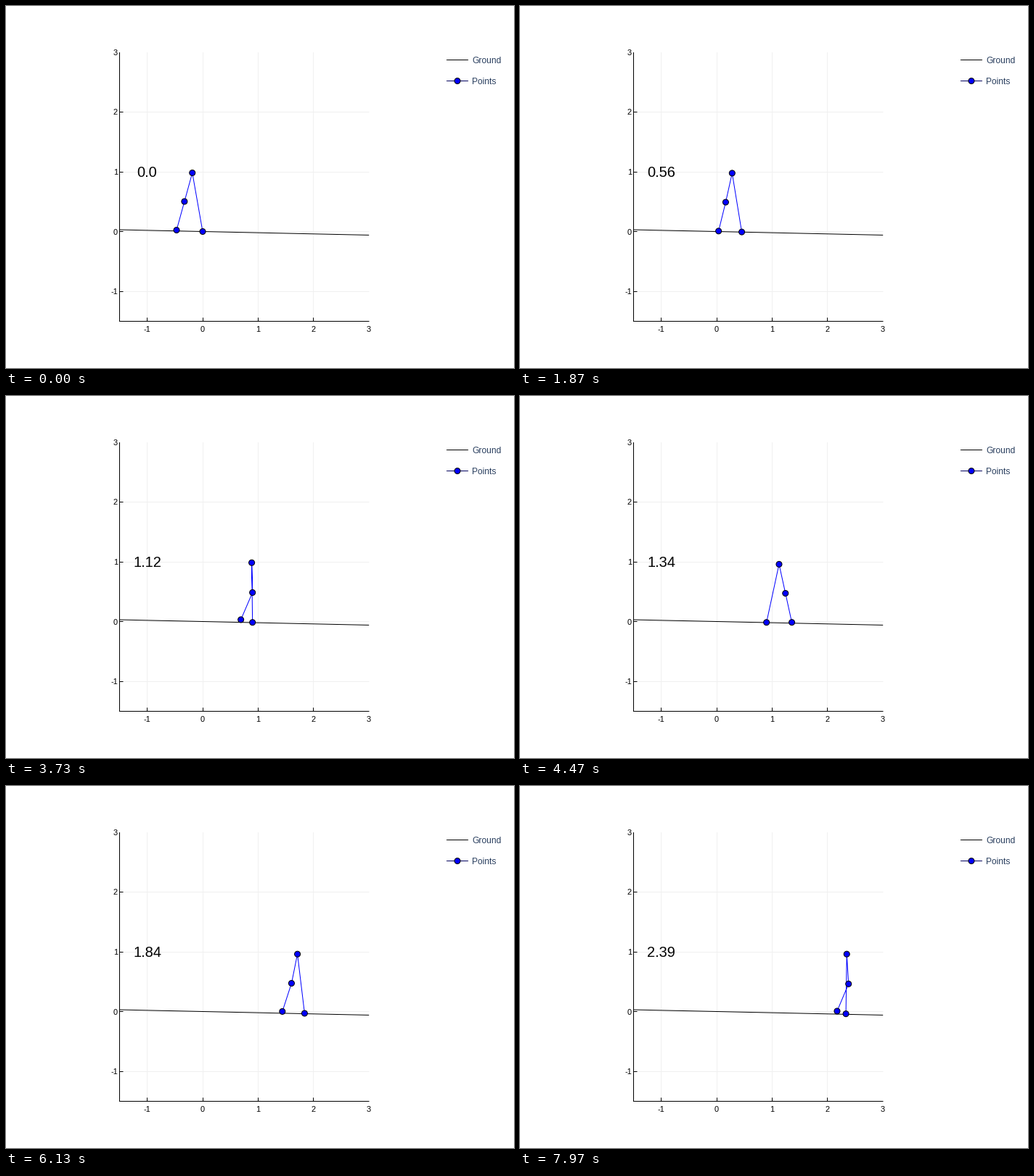
Animation, 700 px wide and 500 px high, one loop 8 s. Source, as a matplotlib script:

```python
import numpy as np
import matplotlib.pyplot as plt
from matplotlib.animation import FuncAnimation
from matplotlib.patches import Circle

W, H, DPI = 700, 500, 100
PX = 72 / DPI
LOOP, TICK = 8000, 20      # ms
STEP_RATE = 0.03           # simulation frames per ms

plt.rcParams["font.family"] = "Liberation Sans"
fig = plt.figure(figsize=(W / DPI, H / DPI), dpi=DPI, facecolor="white")
ax = fig.add_axes([0, 0, 1, 1])
ax.set_xlim(0, W)
ax.set_ylim(H, 0)
ax.axis("off")


def sx(x):
    return 271 + 76.4 * np.asarray(x)


def sy(y):
    return 311.5 - 82.5 * np.asarray(y)


def line(xs, ys, color="black", z=2):
    return ax.plot(xs, ys, color=color, lw=PX, zorder=z, snap=False,
                   solid_capstyle="butt")[0]


def label(x, y, text, size, color="black", ha="center"):
    return ax.text(x, y, text, fontsize=size * PX, color=color, ha=ha,
                   va="baseline", zorder=4)


def dot(x, y):
    return ax.add_patch(Circle((x, y), 4, fc="#0000ff", ec="black", lw=PX,
                               zorder=6))


# Axes, grid and ticks
LEFT, RIGHT, TOP, BOTTOM = 156.5, 500.5, 64, 435.5
for v in range(-1, 3):
    gx, gy = np.floor(sx(v)) + 0.5, np.floor(sy(v)) + 0.5
    line([gx, gx], [TOP, BOTTOM], "#f0f0f0", 1)
    line([LEFT, RIGHT], [gy, gy], "#f0f0f0", 1)
    line([gx, gx], [BOTTOM, BOTTOM - 5])
    line([LEFT, LEFT + 5], [gy, gy])
for v in range(-1, 4):
    label(sx(v), 450, str(v), 11)
    label(154, sy(v) + 4, str(v), 11, ha="right")
line([LEFT, LEFT], [TOP, BOTTOM + 0.5])
line([LEFT - 0.5, RIGHT], [BOTTOM, BOTTOM])
line(sx([-1.5, 3]), sy([0.03, -0.06]), z=3)

# Legend
line([607, 637], [74.5, 74.5])
line([607, 637], [103.5, 103.5], "#000060")
dot(622, 103.5)
label(642, 79, "Ground", 12, "#2a3f5f", "left")
label(642, 108, "Points", 12, "#2a3f5f", "left")

# Walker: a straight stance leg and a swing leg with a knee
SLOPE = 0.0165
FIRST, PERIOD = 0.53, 0.4125                 # step durations
FIRST_HALF, FIRST_SLOPE = 0.238, 0.0504      # starting pose

# Swing thigh angle at a few phases of the step
THIGH_FIRST = [(0, -.288), (.19, -.1), (.47, .2), (.64, .291), (.82, .335),
               (1, .212)]
THIGH_NEXT = [(0, -.255), (.175, -.217), (.43, .018), (.515, .058),
              (.58, .09), (.82, .275), (1, .212)]


def spline(x, knots):
    """Smooth cubic curve through (x, y) knots."""
    xs, ys = np.array(knots).T
    m = np.gradient(ys, xs)
    i = int(np.clip(np.searchsorted(xs, x, "right") - 1, 0, len(xs) - 2))
    h = xs[i + 1] - xs[i]
    u = (x - xs[i]) / h
    return ((1 + 2 * u) * (1 - u) ** 2 * ys[i] + u * (1 - u) ** 2 * h * m[i]
            + u * u * (3 - 2 * u) * ys[i + 1] + u * u * (u - 1) * h * m[i + 1])


def foothold(k):
    return 0.022 + 0.4228 * k + 0.0078 * k * k if k else 0.0


def half_angle(k):
    return np.arcsin((foothold(k + 1) - foothold(k)) / 2)


def knee_bend(p, height, lock, skew):
    """Bend and stretch again until the knee locks."""
    u = min(p / lock, 1) ** skew
    return height * max(0, np.sin(np.pi * u)) ** 1.3


def pose(t):
    """Step number, stance lean, thigh angle and knee bend."""
    if t < FIRST:
        k, p = 0, t / FIRST
        half, slope, sag = FIRST_HALF, FIRST_SLOPE, 0.046
        keys, bend = THIGH_FIRST, knee_bend(p, 0.45, 0.69, 1.147)
    else:
        n, p = divmod((t - FIRST) / PERIOD, 1)
        k = int(n) + 1
        half, slope, sag = half_angle(k - 1), SLOPE, 0.009
        keys, bend = THIGH_NEXT, knee_bend(p, 0.49, 0.81, 1.437)
    start, end = slope - half, half_angle(k) + SLOPE
    lean = (start + (end - start) * (p + 0.032 * np.sin(2 * np.pi * p))
            - sag * np.sin(np.pi * p))
    # Meet the pose of the step before and the step after
    thigh = (spline(p, keys) + (-half - slope - keys[0][1]) * (1 - p)
             + (half_angle(k) - SLOPE - keys[-1][1]) * p)
    return k, lean, thigh, bend


def walker(t):
    k, lean, thigh, bend = pose(t)
    shank = thigh - bend
    fx, fy = foothold(k), -SLOPE * foothold(k)
    hx, hy = fx + np.sin(lean), fy + np.cos(lean)
    kx, ky = hx + 0.5 * np.sin(thigh), hy - 0.5 * np.cos(thigh)
    ex, ey = kx + 0.5 * np.sin(shank), ky - 0.5 * np.cos(shank)
    return sx([fx, hx, kx, ex]), sy([fy, hy, ky, ey])


legs = line([], [], "#0000ff", 5)
joints = [dot(0, 0) for _ in range(4)]
clock = label(194.6, 236, "0.0", 20)


def draw(i):
    t = int(i * TICK * STEP_RATE + 0.5) / 100
    xs, ys = walker(t)
    legs.set_data(xs, ys)
    for joint, x, y in zip(joints, xs, ys):
        joint.center = x, y
    clock.set_text(str(t))
    return [legs, clock, *joints]


anim = FuncAnimation(fig, draw, frames=LOOP // TICK, interval=TICK,
                     init_func=lambda: draw(0), repeat=True, repeat_delay=0)
plt.show()
```
